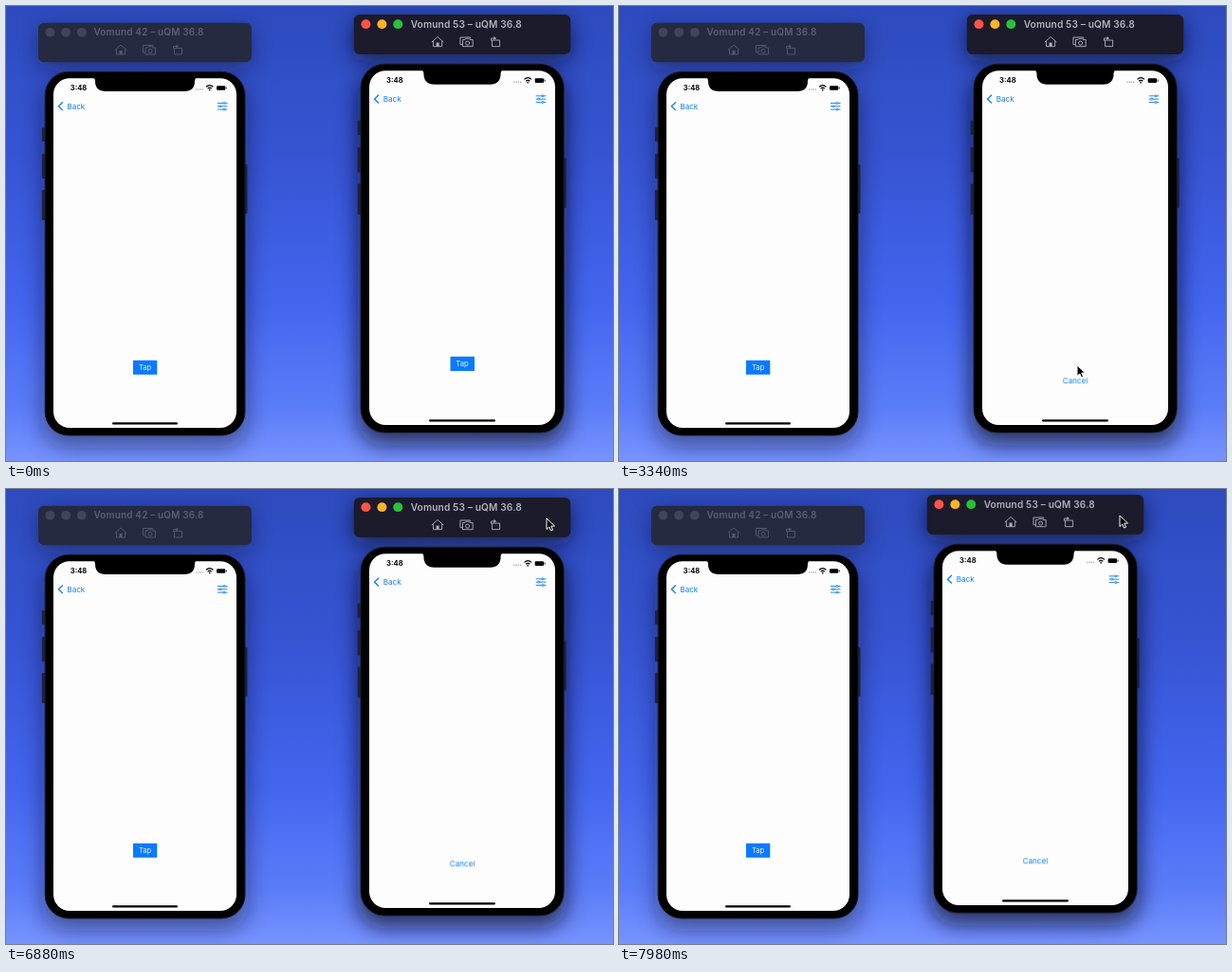
Recreate the animation shown at these times as an HTML page. Size 640x480 px, loop 8000 ms.

```html
<!DOCTYPE html>
<html lang="en">
<head>
<meta charset="utf-8">
<title>Two phone windows</title>
<style>
  html, body { margin: 0; width: 100%; height: 100%; overflow: hidden; background: #4060e0; }
  svg { display: block; width: 100%; height: 100%; }
  text { font-family: Inter, "Open Sans", sans-serif; font-size: 8px; }

  .title { font-size: 10px; font-weight: 600; letter-spacing: .15px; fill: var(--title); }
  .tools { fill: none; stroke: var(--icon); stroke-width: .9; stroke-linejoin: round; }
  .solid { fill: var(--icon); stroke: none; }
  .time { font-size: 7.5px; font-weight: 700; }
  .link { fill: #0f7cf0; }
  .line { fill: none; stroke: #0f7cf0; stroke-width: .9; }
  .mid { text-anchor: middle; }
  .back-window { --bar: #262a40; --title: #5b5f74; --icon: #575b70; --close: #41455a; --min: #41455a; --zoom: #41455a; }
  .front-window { --bar: #1c1b2b; --title: #b4b3c0; --icon: #b0afbd; --close: #ff5449; --min: #fdb42a; --zoom: #28c13c; }

  .front-window, .cursor, .tap, .cancel { animation: 8s linear infinite; }
  .front-window { animation-name: drag; }
  .cursor { animation-name: point; }
  .tap { animation-name: leave; }
  .cancel { animation-name: arrive; }

  /* the last bezier is an exact t² acceleration */
  @keyframes drag {
    0% { transform: translate(0, 0); }
    93.55% { transform: translate(0, 0); animation-timing-function: cubic-bezier(.3333, 0, .6667, .3333); }
    100% { transform: translate(-45.4px, -3.2px); }
  }
  @keyframes point {
    0%, 15% { transform: translate(655px, 470px); animation-timing-function: ease-in-out; }
    25%, 55% { transform: translate(483px, 379px); animation-timing-function: ease-in-out; }
    66.25% { transform: translate(542px, 62px); animation-timing-function: ease-out; }
    73% { transform: translate(570px, 31px); }
    93.55% { transform: translate(570px, 31px); animation-timing-function: cubic-bezier(.3333, 0, .6667, .3333); }
    100% { transform: translate(524.6px, 27.8px); }
  }
  @keyframes leave { 0%, 33.5% { opacity: 1; } 35%, 100% { opacity: 0; } }
  @keyframes arrive { 0%, 33.5% { opacity: 0; } 35%, 100% { opacity: 1; } }
</style>
</head>
<body>
<svg viewBox="0 0 640 480" preserveAspectRatio="none">
  <defs>
    <linearGradient id="sky" x2="0" y2="1">
      <stop offset="0" stop-color="#2d4bbd"/>
      <stop offset=".35" stop-color="#3755d4"/>
      <stop offset=".65" stop-color="#4365ee"/>
      <stop offset=".88" stop-color="#5b7cf8"/>
      <stop offset="1" stop-color="#7793ff"/>
    </linearGradient>
    <filter id="blur" x="-30%" y="-30%" width="160%" height="160%">
      <feGaussianBlur stdDeviation="11"/>
    </filter>

    <g id="shadow" filter="url(#blur)" fill="#070a20">
      <rect x="34" y="24" width="225" height="42" rx="8"/>
      <rect x="38" y="80" width="217" height="386" rx="26"/>
    </g>

    <g id="bar">
      <rect x="34" y="17.7" width="225" height="41.5" rx="6" fill="var(--bar)"/>
      <circle cx="46.5" cy="27.8" r="4.9" fill="var(--close)"/>
      <circle cx="63.2" cy="27.8" r="4.9" fill="var(--min)"/>
      <circle cx="79.8" cy="27.8" r="4.9" fill="var(--zoom)"/>
      <g class="tools">
        <path d="M114.8 46.5 121 41l6.2 5.5M116.5 45.5V51h9v-5.5"/>
        <path class="solid" d="M119.5 47h3v4h-3z"/>
        <path d="M146.5 49h-2v-7.5H155V43M147 44h2.5l1-1.300h3l1 1.300h3v7H147z"/>
        <circle cx="152" cy="47.5" r="2"/>
        <path d="M177.500 44.500h8V51h-8zM176.500 45v-2.500h3.500"/>
        <path class="solid" d="M179.500 40.500v4l2.500-2z"/>
      </g>
    </g>

    <g id="phone">
      <g fill="#1d2040">
        <rect x="37.9" y="128" width="5" height="15" rx="1"/>
        <rect x="37.9" y="156" width="5" height="26" rx="1"/>
        <rect x="37.9" y="194" width="5" height="32" rx="1"/>
        <rect x="250" y="167" width="4.5" height="52" rx="1"/>
      </g>
      <rect x="41.2" y="69.3" width="210.8" height="383.7" rx="25" fill="#000" stroke="#1a1b28"/>
      <rect x="50" y="76.2" width="193" height="368.8" rx="17" fill="#fdfdfd"/>
      <text class="time" x="67.8" y="89">3:48</text>
      <path d="M200 88h8" stroke="#888" stroke-dasharray="1.2 1"/>
      <g fill="none" stroke="#000" stroke-width="1.2">
        <path d="M211 85.300q3.700-3.400 7.400 0M212.600 87.100q2.100-1.800 4.200 0"/>
        <circle cx="214.7" cy="88.5" r=".3"/>
      </g>
      <rect x="222" y="84.2" width="9.3" height="4.6" rx="1.2"/>
      <path d="M232.300 85.500v2" stroke="#000" stroke-width=".8"/>
      <path class="line" style="stroke-width:1.3px" d="m59.800 101.500-4.400 4.300 4.400 4.300"/>
      <text class="link" x="64.5" y="108.7">Back</text>
      <path class="line" d="M223 102.500h10.500M223 105.800h10.500M223 109.100h10.500"/>
      <g class="line" style="fill:#fdfdfd">
        <circle cx="230" cy="102.5" r="1"/>
        <circle cx="226" cy="105.8" r="1"/>
        <circle cx="230" cy="109.1" r="1"/>
      </g>
      <rect x="112" y="439.3" width="69" height="2.2" rx="1.1"/>
    </g>

    <g id="button">
      <rect x="134" y="373.8" width="25.3" height="15" fill="#0a7aff"/>
      <text class="mid" x="146.6" y="384" fill="#e9f2ff" style="font-size:7.6px">Tap</text>
    </g>
  </defs>

  <rect width="640" height="480" fill="url(#sky)"/>

  <g class="back-window">
    <use href="#shadow" opacity=".42"/>
    <use href="#bar"/>
    <text class="title" x="92.5" y="31.2">Vomund 42 – uQM 36.8</text>
    <use href="#phone"/>
    <path d="M91 75q3 1 3 4 0 11 11 11h83q11 0 11-11 0-3 3-4z"/>
    <use href="#button"/>
  </g>

  <g class="front-window">
    <g transform="translate(383 68) scale(1.0155 1.0135) translate(-50 -76)">
      <use href="#shadow" opacity=".68"/>
      <use href="#bar"/>
      <text class="title" x="93" y="31.2">Vomund 53 – uQM 36.8</text>
      <use href="#phone"/>
      <path d="M103.500 75q3 1 3 4 0 11.500 11 11.500h58q11 0 11-11.500 0-3 3-4z"/>
      <use class="tap" href="#button"/>
      <text class="link mid cancel" x="146.6" y="401.4">Cancel</text>
    </g>
  </g>

  <path class="cursor" d="M0 0v11.500l2.800-2.500 1.800 4 2-.8-1.800-4 3.700-.2z" fill="#000" stroke="#fff"/>
</svg>
</body>
</html>
```
